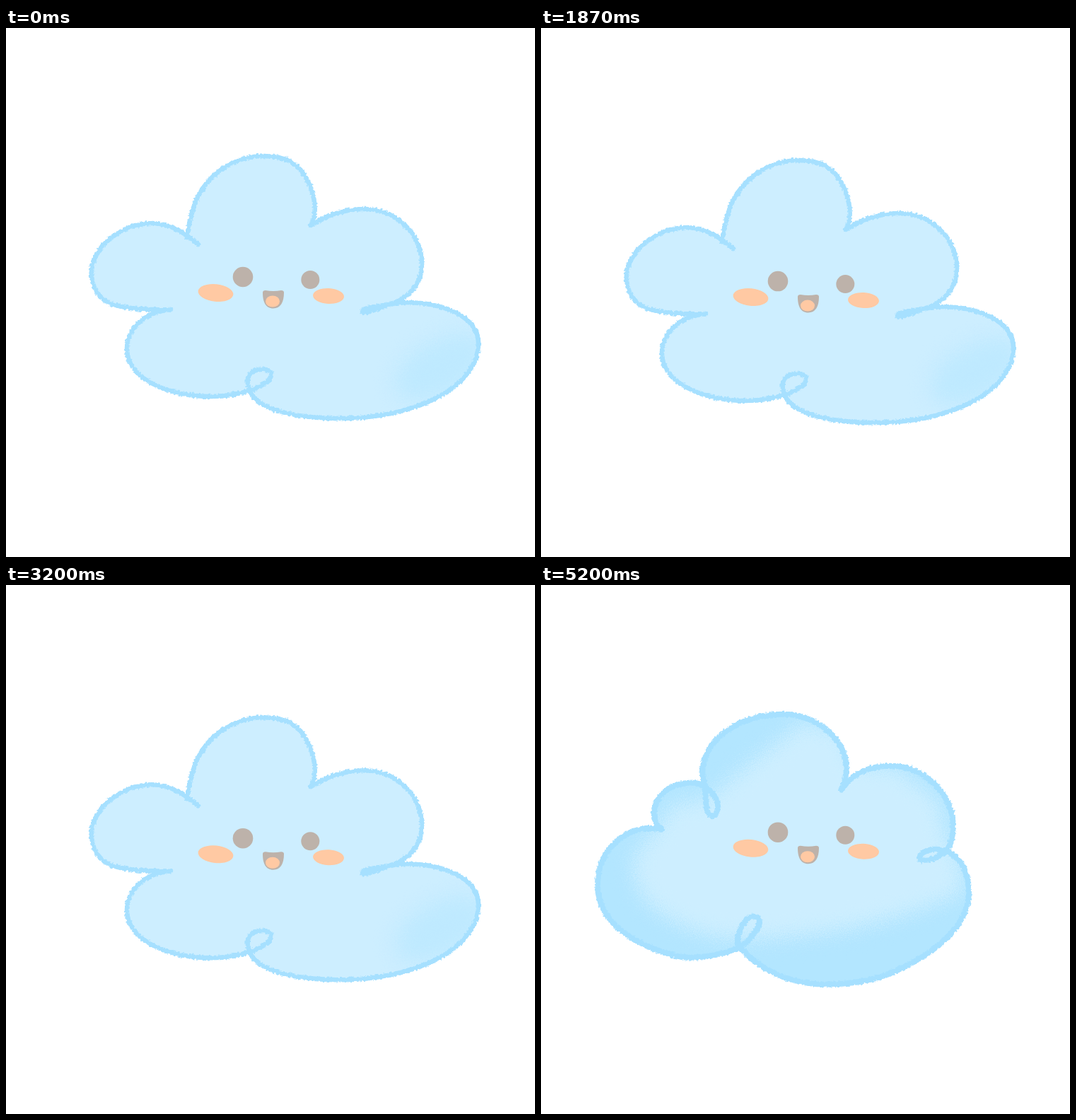
An HTML page for the animation above (5270 ms loop, 748 px wide and 748 px high).

```html
<!DOCTYPE html>
<html lang="en">
<head>
<meta charset="utf-8">
<title>Happy cloud</title>
<style>
  html, body { margin: 0; width: 100%; height: 100%; overflow: hidden; background: #fff; }
  svg { display: block; width: 100vw; height: 100vh; }
  .body { fill: #cdeeff; }
  .line { fill: none; stroke: #a6e0ff; stroke-width: 6.6; stroke-linecap: round; stroke-linejoin: round; filter: url(#rough); }
  .bold { stroke-width: 8; }
  .shade { fill: #b3e6ff; }
  .grain { filter: url(#grain); }
  .grey { fill: #bdb2aa; }
  .peach { fill: #ffc9a3; }
</style>
</head>
<body>
<svg viewBox="0 0 748 748">
  <defs>
    <filter id="rough" filterUnits="userSpaceOnUse" x="0" y="100" width="748" height="520" color-interpolation-filters="sRGB">
      <feTurbulence type="fractalNoise" baseFrequency=".3" numOctaves="2" seed="4" result="noise"/>
      <feDisplacementMap in="SourceGraphic" in2="noise" scale="5" xChannelSelector="R" yChannelSelector="G"/>
    </filter>
    <filter id="grain" filterUnits="userSpaceOnUse" x="0" y="100" width="748" height="520" color-interpolation-filters="sRGB">
      <feGaussianBlur stdDeviation="13" result="soft"/>
      <feTurbulence type="fractalNoise" baseFrequency=".7" numOctaves="2" seed="9" result="noise"/>
      <feDisplacementMap in="soft" in2="noise" scale="45" xChannelSelector="R" yChannelSelector="G"/>
    </filter>

    <path id="wide" d="M272 306C250 288 232 276 206 276C160 277 122 312 121 344C120 368 134 386 152 391C176 398 206 399 233 398C196 402 171 424 171 455C172 494 226 521 290 521C335 521 376 504 375 489C374 480 352 481 345 489C338 497 343 515 352 524C372 544 425 553 478 552C590 550 668 503 668 446C668 408 618 387 560 388C536 389 516 404 505 402C500 398 515 394 535 392C568 386 588 362 588 334C588 290 550 256 508 256C478 256 455 264 431 279C442 262 436 230 422 208C410 189 392 181 364 181C322 181 284 207 268 246C261 264 258 280 256 296"/>
    <path id="middle" d="M246 304C230 280 205 272 180 278C120 290 84 335 85 385C86 430 120 452 165 446C160 490 205 520 270 518C305 517 335 502 338 486C338 474 320 474 315 488C312 530 380 559 460 558C560 556 642 510 642 450C642 405 600 380 560 384C540 386 528 398 518 396C514 388 530 384 550 380C580 366 588 345 586 320C580 280 545 254 502 254C472 254 448 264 428 282C440 250 428 215 400 194C360 168 290 180 258 226C240 252 238 282 246 304Z"/>
    <path id="puffy" d="M171 342C154 330 158 305 172 291C186 278 205 275 218 276C236 280 252 297 250 312C248 324 240 326 235 316C232 305 233 290 231 277C224 258 231 232 250 213C276 188 312 178 345 179C385 180 420 206 430 240C434 258 431 272 425 286C440 262 464 252 495 252C540 252 575 288 582 325C584 348 580 364 573 372C560 384 545 387 536 384C532 377 545 370 558 370C588 370 605 398 605 430C605 480 555 520 490 547C460 558 430 561 400 561C350 560 308 540 281 508C272 498 285 468 298 465C311 463 311 475 305 483C294 500 294 500 276 511C252 520 230 523 210 523C190 523 155 512 128 495C95 475 80 450 80 420C80 375 115 340 155 340L171 342"/>
    <clipPath id="inWide"><use href="#wide"/></clipPath>
    <clipPath id="inMiddle"><use href="#middle"/></clipPath>
    <clipPath id="inPuffy"><use href="#puffy"/></clipPath>
  </defs>

  <g id="cloud">
    <g class="pose" transform="translate(0 -6)">
      <use href="#wide" class="body"/>
      <g clip-path="url(#inWide)">
        <ellipse class="shade grain" cx="615" cy="480" rx="70" ry="38" transform="rotate(-28 615 480)" opacity=".55"/>
      </g>
      <use href="#wide" class="line"/>
    </g>
    <g class="pose">
      <use href="#middle" class="body"/>
      <g clip-path="url(#inMiddle)">
        <ellipse class="shade grain" cx="580" cy="500" rx="80" ry="35" transform="rotate(-28 580 500)" opacity=".6"/>
        <ellipse class="shade grain" cx="105" cy="390" rx="25" ry="50" opacity=".6"/>
      </g>
      <use href="#middle" class="line"/>
    </g>
    <g class="pose">
      <use href="#puffy" class="shade"/>
      <g clip-path="url(#inPuffy)">
        <path class="body grain" d="M130 380L165 340L188 305L235 300L262 275L370 190L430 205L440 250L500 254L562 300L572 350L592 390L598 430Q500 475 400 488Q320 498 290 496Q230 502 165 458Q128 430 130 380Z"/>
      </g>
      <use href="#puffy" class="line bold"/>
    </g>
    <g>
      <g class="grey">
        <circle cx="335" cy="346" r="14.3"/>
        <circle cx="430.3" cy="350" r="13"/>
        <path d="M363 368Q363 365 367 365Q378 367 389 365Q393 365 393 368C393 382 388 390.500 378 390.500C367 390.500 363 381 363 368Z"/>
      </g>
      <g class="peach">
        <ellipse cx="296.500" cy="368.500" rx="25" ry="12.300" transform="rotate(6 296.500 368.500)"/>
        <ellipse cx="456" cy="373" rx="22" ry="11" transform="rotate(3 456 373)"/>
        <ellipse cx="377" cy="380.500" rx="10" ry="8"/>
      </g>
    </g>
  </g>
</svg>
<script>
  const LOOP = 5270;
  const STEP = 1000 / 15;
  const CYCLE = 11.36; // steps per bounce
  const POSE_STARTS = [0, 5.4, 8.6];
  // [step in the bounce, drop in pixels]
  const BOUNCE = [[0, 6], [1.2, 9.6], [2.6, 12.3], [4.2, 13], [5.6, 11.8], [9.3, 5], [10.65, 1.8], [11, 0.2], [CYCLE, 0]];

  const cloud = document.getElementById('cloud');
  const poses = [...document.querySelectorAll('.pose')];

  function dropAt(phase) {
    const i = BOUNCE.findIndex(([at]) => at > phase);
    const [x0, y0] = BOUNCE[i - 1], [x1, y1] = BOUNCE[i];
    return y0 + (y1 - y0) * (phase - x0) / (x1 - x0);
  }

  let shown = -1;
  function draw(time) {
    const step = Math.floor((time % LOOP + 5) / STEP);
    if (step === shown) return;
    shown = step;
    const phase = step % CYCLE;
    const active = POSE_STARTS.filter(start => start <= phase).length - 1;
    poses.forEach((pose, i) => pose.style.display = i === active ? '' : 'none');
    cloud.setAttribute('transform', `translate(0 ${dropAt(phase).toFixed(2)})`);
  }

  const begin = performance.now();
  function tick() {
    draw(performance.now() - begin);
    requestAnimationFrame(tick);
  }
  tick();
</script>
</body>
</html>
```
